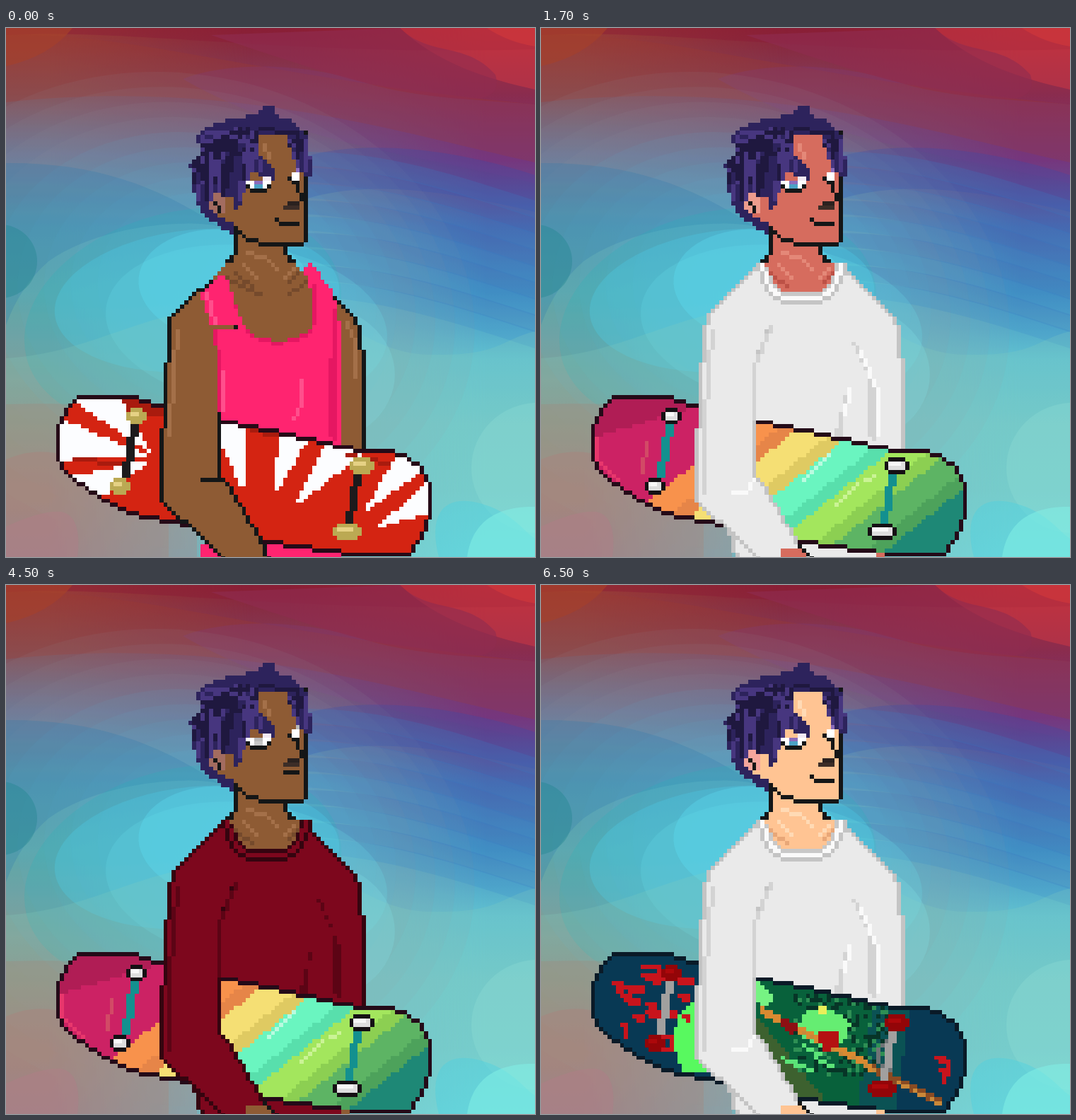
These frames come from a looping animation (748 by 748 pixels, 8000 ms). An HTML page with a canvas:

```html
<!DOCTYPE html>
<html lang="en">
<head>
<meta charset="utf-8">
<title>Skater outfits</title>
<style>
html, body { margin: 0; width: 100%; height: 100%; overflow: hidden; background: #4aa8c4; }
canvas { display: block; width: 100vw; height: 100vh; }
</style>
</head>
<body>
<canvas id="stage" width="748" height="748"></canvas>
<script>
const SIZE = 748, CELL = SIZE / 128, GRID = 129;
const INK = '#141617';

function makeContext(size, options) {
  const c = document.createElement('canvas');
  c.width = c.height = size;
  return c.getContext('2d', options);
}

function random(seed) {
  return () => (seed = seed * 16807 % 2147483647) / 2147483647;
}

// ---------- backdrop ----------
function ramp(g, colors, x = 0, width = 0) {
  const grad = g.createLinearGradient(x, 0, x + width, width ? 0 : SIZE);
  colors.split(' ').forEach((c, i, all) => grad.addColorStop(i / (all.length - 1), c));
  g.fillStyle = grad;
  g.fillRect(0, 0, SIZE, SIZE);
}

function makeBackdrop() {
  const g = makeContext(SIZE);
  const side = (colors, mask, x, width) => {
    const s = makeContext(SIZE);
    ramp(s, colors);
    s.globalCompositeOperation = 'destination-in';
    ramp(s, mask, x, width);
    g.drawImage(s.canvas, 0, 0);
  };
  const shape = (color, alpha, path) => {
    g.globalAlpha = alpha;
    g.fillStyle = color;
    g.fill(typeof path === 'string' ? new Path2D(path) : path);
    g.globalAlpha = 1;
  };
  const oval = (color, alpha, x, y, rx, ry, turn = 0) => {
    const p = new Path2D();
    p.ellipse(x, y, rx, ry, turn, 0, 7);
    shape(color, alpha, p);
  };

  // evenly spaced tones, top to bottom
  ramp(g, '#8a2236 #823f5c #62648f #459fc8 #50c4d8 #68cbce #74c8cc #74bfca #6cbccc');
  side('#9a3a34 #855259 #66789a #3d9db4 #44afac #70a79b #8e947f #a08078 #947a8c', '#000f #0000', 60, 290);
  side('#b42c38 #8a2c4e #73357a #4a68ae #4490c2 #60c0d0 #70c8cc #72cccf #74dcdf', '#0000 #000f', 400, 280);

  shape('#8a1c36', .45, 'M0 10C180 0 400 40 748 30V0H0Z');
  shape('#ab4428', .6, 'M0 54Q62 40 94 0H0Z');
  shape('#9b3b30', .3, 'M0 10C180 5 360 70 748 108V190C560 150 320 70 0 105Z');
  shape('#7d3c88', .22, 'M250 72C320 45 430 52 500 75S650 100 748 108V220C600 180 420 170 250 72Z');
  shape('#d23944', .5, 'M557 0C610 50 680 72 748 87V0Z');
  shape('#902c50', .6, 'M557 0C600 42 650 18 692 66C703 102 665 104 620 98C520 88 410 50 290 10Z');
  shape('#d93a3a', .5, 'M680 0Q710 20 748 26V0Z');

  for (let i = 0; i < 9; i++) {
    oval(i < 4 ? '#8f8f9a' : '#5ab4cc', .09, 245 + i * 5, 400 - i * 4, 420 - i * 33, 335 - i * 25, .18);
  }
  shape('#2d78ac', .25, 'M0 191C120 190 210 220 300 280C250 270 130 280 60 330Q20 365 0 420Z');
  shape('#314cb0', .25, 'M400 190C470 160 600 160 748 208V260C620 230 500 210 400 250Z');
  for (let i = 0; i < 9; i++) {
    const y = 176 + i * 23;
    shape(i % 2 ? '#386ab8' : '#3484c8', .2,
      `M390 ${y}C520 ${y - 8} 630 ${y + 30} 748 ${y + 68}v25C640 ${y + 58} 520 ${y + 18} 390 ${y + 17}Z`);
  }
  oval('#22b6b8', .2, 250, 410, 228, 150, -.25);
  oval('#4dcfee', .28, 270, 385, 202, 100, -.1);
  oval('#6ae0ea', .2, 340, 420, 200, 112, .12);
  oval('#5ce2f4', .3, 310, 365, 123, 80, .1);
  oval('#22858e', .4, -8, 330, 52, 52);
  shape('#84ccba', .22, 'M0 467C120 460 190 400 330 390S500 460 600 462S700 440 748 429V748H0Z');
  oval('#80e0e2', .25, 430, 490, 120, 100);
  shape('#a48372', .28, 'M0 532C90 530 160 530 230 560V748H0Z');
  shape('#b57672', .28, 'M0 610C80 575 140 630 270 700V748H0Z');
  shape('#b67a86', .35, 'M0 705Q50 682 78 684Q108 690 101 748H0Z');
  oval('#8edcd4', .32, 752, 622, 94, 92);
  shape('#4ad0e2', .4, 'M612 748C595 680 625 660 670 672S730 710 748 722V748Z');
  shape('#82f0e6', .55, 'M652 748C660 690 705 676 748 677V748Z');
  return g.canvas;
}

// ---------- pixel tools ----------
const scratch = makeContext(GRID, { willReadFrequently: true });
let px;

// the set of cells a path covers
function mask(d) {
  scratch.clearRect(0, 0, GRID, GRID);
  scratch.fill(new Path2D(d));
  const data = scratch.getImageData(0, 0, GRID, GRID).data;
  return (x, y) => x >= 0 && x < GRID && data[(Math.min(y, GRID - 1) * GRID + x) * 4 + 3] > 127;
}

function box(color, x, y, w = 1, h = 1) {
  px.fillStyle = color;
  px.fillRect(x, y, w, h);
}

function each(m, visit) {
  for (let y = 0; y < GRID; y++) for (let x = 0; x < GRID; x++) if (m(x, y)) visit(x, y);
}

function rim(color, m, top) {
  each(m, (x, y) => {
    if (!m(x - 1, y) || !m(x + 1, y) || !m(x, y + 1) || top && !m(x, y - 1)) box(color, x, y);
  });
}

function paint(color, d, clip) {
  const m = mask(d);
  each(m, (x, y) => { if (!clip || clip(x, y)) box(color, x, y); });
  return m;
}

function line(color, str, clip) {
  const p = str.split(' ').map(Number);
  for (let i = 2; i < p.length; i += 2) {
    const dx = p[i] - p[i - 2], dy = p[i + 1] - p[i - 1];
    const n = Math.max(Math.abs(dx), Math.abs(dy), 1);
    for (let k = 0; k <= n; k++) {
      const x = Math.round(p[i - 2] + dx * k / n), y = Math.round(p[i - 1] + dy * k / n);
      if (!clip || clip(x, y)) box(color, x, y);
    }
  }
}

const lines = (color, ...list) => list.forEach(s => line(color, s));

// ---------- skateboards ----------
const board = mask('M19 89H31L36 91 86 102H93Q101 104 103 111V118Q101 125 97 128H84L64 125 30 118Q17 112 13 106L12 103V98Q14 89 19 89Z');

function trucks(axle, base, light, frame) {
  for (const [top, bottom, y] of [[30, 28, 95], [84, 82, 107]]) {
    for (let k = 0; k < 14; k++) box(axle, Math.round(top + (bottom - top) * k / 13), y + k, 2);
  }
  for (const [x, y, w] of [[30, 93, 3], [26, 110, 3], [84, 105, 4], [80, 121, 5]]) {
    box(frame, x, y - 1, w, 4);
    box(frame, x - 1, y, w + 2, 2);
    box(base, x, y, w, 2);
    box(light, x, y, w - 1);
  }
}

function rainbowBoard() {
  const bands = ['#f8924c', '#f5df74', '#6af5c0', '#a3e65d', '#5db464', '#1e8876'];
  const shades = ['#e68548', '#dfca62', '#58dfac', '#8ccf52', '#4da25b', '#1e8876'];
  each(board, (x, y) => {
    const k = (x + 1.25 * y - 168) / 14.5, i = Math.floor(k);
    const red = y < 94 + (28 - x) * .3 ? '#b01d55' : '#cc2264';
    box(k < 0 ? red : (k - i > .64 ? shades : bands)[Math.min(i, 5)], x, y);
  });
  line('#b9fbe0', '63 109 69 103');
  lines('#cbf396', '71 115 76 110', '78 109 80 108');
  line('#d24a66', '25 100 24 107');
  line('#e8376c', '13 99 13 104 18 109');
  rim('#240a18', board, true);
  trucks('#13908f', '#dedede', '#f8f8f8', '#151014');
}

function fan(cx, cy, inner, outer, angles) {
  for (const deg of angles) {
    const a = deg * Math.PI / 180, c = Math.cos(a), s = Math.sin(a), w = (outer - inner) * .23;
    const ox = cx + outer * c, oy = cy + outer * s;
    paint('#fcfdff', `M${cx + inner * c} ${cy + inner * s}L${ox - s * w} ${oy + c * w} ${ox + s * w} ${oy - c * w}Z`, board);
  }
}

function sunBoard() {
  each(board, (x, y) => box(y < 91 + x * .06 && x > 26 && x < 40 ? '#a91b0e' : '#d42412', x, y));
  fan(36, 104, 1, 27, [227, 190, 155]);
  fan(60, 128, 15, 42, [-100, -72, -51]);
  fan(77, 128, 14, 42, [-48, -29]);
  lines('#a91b0e', '59 97 65 98', '82 103 92 105', '16 104 28 105');
  rim('#260a17', board, true);
  trucks('#1c1a1c', '#bba953', '#e5d184', '#bba953');
}

function swampBoard() {
  const rnd = random(71);
  const spot = (x, y, w, h) => [Math.floor(x + rnd() * w), Math.floor(y + rnd() * h)];
  each(board, (x, y) => {
    const k = x + y * .15;
    box(x < 45 ? '#083954' : k < 95 ? '#08613b' : k < 104 ? '#0b5254' : '#083954', x, y);
  });
  paint('#58f95f', 'M38 100L33 104 32 111 34 118H42V100Z', board);
  paint('#3d612f', 'M51 103L68 124V129H61L51 111Z', board);
  for (let i = 0; i < 230; i++) {
    const [x, y] = spot(61, 99, 23, 20);
    if (board(x, y)) box(i % 3 ? '#073527' : '#2e8f54', x, y);
  }
  // loose green leaf shapes
  paint('#65ed72', 'M64 103H70L75 106 73 111H65L62 107Z');
  paint('#76f383', 'M52 96L56 99 55 102 52 101Z');
  for (let i = 0; i < 7; i++) {
    const [x, y] = spot(58, 108, 12, 8);
    line('#5be477', `${x} ${y} ${x + 4} ${y + 2}`, board);
  }
  box('#e9ef59', 67, 102, 2, 2);
  for (let x = 53; x < 97; x++) {
    box(x < 80 ? '#d98a31' : '#8a4b22', x, Math.round(102 + (x - 53) * .52), 1, 2);
    if (rnd() < .4) box('#c98839', x, Math.round(103 + (x - 53) * .52));
  }
  paint('#b41112', 'M67 108H72V112L68 113Z');
  paint('#8d0f13', 'M57 105L62 106 61 109Z');
  line('#6f7476', '83 110 81 112 81 115 84 117');
  const scrawl = (count, left, top, w, h) => {
    for (let i = 0; i < count; i++) {
      const [x, y] = spot(left, top, w, h), dx = Math.round(rnd() * 4), dy = Math.round(rnd() * 3);
      line('#c8141c', `${x} ${y} ${x + dx} ${y} ${x + dx} ${y + dy} ${x + 1} ${y + dy}`, board);
    }
  };
  scrawl(19, 14, 91, 21, 19);
  scrawl(3, 92, 113, 5, 5);
  rim('#0a1a27', board, true);
  trucks('#a1a09f', '#930508', '#ad080b', '#930508');
}

// ---------- clothes ----------
const SLEEVE = 'M39 72H56L52 82V108L55 112 62 124 64 129H53L46 122.5 38 116 37 114V97H38V81H39Z';

function sleeve(color, edge) {
  rim(edge, paint(color, SLEEVE));
}

function neck(s, hem) {
  paint(s.skin, hem);
  rim(INK, paint(s.skin, 'M55 46H68V55L71 57H53L55 54Z'));
  paint(s.skin, 'M56 54H67L69 58H54Z');
  lines(s.glow, '58 54 62 55', '63 56 65 58', '57 57 60 60', '67 60 69 58');
  lines(s.shade, '55 59 59 62', '68 61 70 59');
}

function hands(s) {
  box(s.skin, 58, 126, 6, 3);
  line(INK, '62 125 65 128');
  box(s.skin, 81, 127, 2, 2);
}

const sweater = c => ({
  body(s) {
    const r = c.reach;
    rim(c.edge, paint(c.base, `M53 57H72L${85 + r} 70 ${86 + r} 73V78L${87 + r} 81V104L82 129H47L40 100V69Z`), true);
    lines(c.shade, '75 76 80 85 80 99', '76 78 79 84 79 98', '74 87 71 98', '73 89 72 98');
    lines(c.light, '77 78 81 88 81 98', '74 87 73 93');
    rim(c.edge, paint(c.light, 'M52 57Q53 67 62 67H67Q73 66 74 57Z'));
    rim(c.trim, paint(s.skin, 'M54 57Q55 65 61 65H66Q71 64 72 57Z'));
    neck(s, 'M55 57L56 61 61 64H66L70 61 71 57Z');
  },
  arm(s) {
    sleeve(c.base, c.edge);
    lines(c.shade, '55 72 51 82 51 94', '41 73 40 82 39 96 39 112');
    line(c.light, '46 112 49 112 51 109');
    hands(s);
  }
});

const paleSweater = sweater({ base: '#eaeaea', shade: '#d3d3d3', edge: '#c4c4c4', light: '#fafafa', trim: '#c8c8c8', reach: 1 });
const wineSweater = sweater({ base: '#7d071d', shade: '#5c0415', edge: '#35040f', light: '#7d071d', trim: '#350410', reach: 0 });

const tank = {
  body(s) {
    rim(INK, paint(s.skin, 'M54 57H69L84 69 86 73V78H87V104H50L39 80V70L47 63Z'), true);
    neck(s, 'M54 56H69L76 64 74 74H58L50 61Z');
    lines(s.shade, '53 60 61 64', '68 64 72 61');
    lines(s.glow, '82 71 84 76 84 84');
    const shirt = paint('#ff2470', 'M47 64L52 60 54 62Q57 75 61 75L67 76 73 74Q76 68 72 58L74 57 79 64 81 73V129H47L51 100 50 73Z');
    line('#e51762', '54 62 56 69 59 74 65 76 72 74 74 70 74 62', shirt);
    lines('#e51762', '79 68 79 99', '78 80 78 98');
    lines('#ff4f8c', '48 64 52 78 52 92', '71 85 71 91 69 94');
  },
  arm(s) {
    sleeve(s.skin, INK);
    lines(s.glow, '41 73 40 82 39 98');
    line('#e51762', '50 73 51 81 51 92');
    paint('#ff2470', 'M51 73H57L55 83H52Z');
    line(INK, '47 109 51 109');
  }
};

const DARK = '#820008';
const hoodie = {
  body(s) {
    rim(DARK, paint('#ac1119', 'M48 53H56L58 60H68L73 58 80 61 85 67 88 80V104L82 129H47L37 100V74L40 68 48 60Z'), true);
    neck(s, 'M56 54H67L72 57 71 60 67 61H61L57 58Z');
    line(DARK, '49 60 56 59');
    for (const d of ['M51 60H57V82L54 88 55 95H51V84L49 74 53 72Z',
      'M66 61L69 62 68 74 71 77 72 84 70 98H68L69 81 67 72Z',
      'M76 60L81 73 82 79 81 101H79V78L76 69Z']) paint(DARK, d);
    for (let x = 55; x < 78; x++) for (let y = 67; y < 73; y++) {
      if (x !== 67 && x !== 68) box((x + y) % 2 ? '#f6dedf' : '#290a10', x, y);
    }
  },
  arm(s) {
    sleeve('#ac1119', DARK);
    box(DARK, 37, 75, 2, 22);
    lines(DARK, '41 67 51 67', '50 74 51 78 50 85 47 88', '48 109 51 109');
    paint(DARK, 'M52 72H57V82L54 88 55 95H52L50 84Z');
    hands(s);
  }
};

// ---------- head ----------
function hair([base, dark, light]) {
  const rnd = random(29);
  const m = paint(base, 'M61 21L63 19H65V21L70 23 73 26V31L74 32V36H72L69 31 68 26H61V30L65 35V37L60 35 58 37 57 42 55 44V41L50 40 49 43 51 46 55 47V50L48 46 45 39V34L44 33 47 30 46 26 51 23Z');
  for (let i = 0; i < 46; i++) {
    const x = 57 + rnd() * 9, y = 20 + rnd() * 4, side = i % 5 ? -1 : 1;
    const ex = side < 0 ? 45 + rnd() * 18 : 67 + rnd() * 7, ey = 30 + rnd() * 12;
    line(i % 2 ? dark : light, `${(x + ex) / 2} ${y + 4} ${ex} ${(y + ey) / 2} ${ex + side} ${ey}`, m);
  }
  lines(light, '72 27 72 34', '60 29 61 34');
  line(dark, '61 24 68 25');
}

function head(s) {
  rim(INK, paint(s.skin, 'M49 38L54 25H73V52L71 53H63L59 52 55 49 49 45Z'));
  box(s.ear, 49, 40, 4, 5);
  line(INK, '50 42 51 44');
  line(s.glow, '62 28 63 31');
  hair(s.hair);

  box('#ffffff', 58, 37, 6);
  box('#ffffff', 59, 38, 4);
  box('#f2e9f2', 62, 36, 2);
  box(s.iris[0], 60, 37, 2);
  box(s.iris[1], 60, 38, 2);
  line(INK, '58 38 59 39 62 39 63 38');
  box('#ffffff', 69, 35, 2, 2);
  box(s.iris[0], 70, 34);
  line(INK, '68 36 69 37 70 37 70 39 71 40 71 41');
  box('#2a211f', 68, 42, 3);
  box('#3c2d27', 67, 43, 4);
  line(INK, s.stern ? '67 45 70 45' : '65 46 66 47 70 47');
}

// ---------- looks ----------
const violet = ['#2d235c', '#1f183f', '#47367f'];
const blond = ['#ffd011', '#ffad47', '#ffe257'];
const clear = ['#8b6cbb', '#4ba2c5'];
const brown = { skin: '#8e5b34', shade: '#754a2c', glow: '#a47049', ear: '#a36c60', hair: violet, iris: clear };
const coral = { skin: '#d66c5e', shade: '#bd5146', glow: '#e48878', ear: '#ed9c8d', hair: violet, iris: clear };
const rose = { skin: '#f4c4b4', shade: '#e8a999', glow: '#fbdacb', ear: '#e9a49b', hair: blond, iris: ['#7770aa', '#5a98af'] };
const peach = { skin: '#ffc493', shade: '#e8a778', glow: '#ffdab5', ear: '#f5a59c', hair: violet, iris: clear };
const stern = { ...brown, iris: ['#b9b9b9', '#c7c7c7'], stern: true };

const looks = [
  { until: 500, face: brown, wear: tank, deck: sunBoard },
  { until: 2500, face: coral, wear: paleSweater, deck: rainbowBoard },
  { until: 4500, face: rose, wear: hoodie, deck: rainbowBoard },
  { until: 6500, face: stern, wear: wineSweater, deck: rainbowBoard },
  { until: 8000, face: peach, wear: paleSweater, deck: swampBoard }
];

for (const look of looks) {
  px = makeContext(GRID);
  look.canvas = px.canvas;
  look.wear.body(look.face);
  look.deck();
  look.wear.arm(look.face);
  head(look.face);
}

const stage = document.getElementById('stage').getContext('2d');
const backdrop = makeBackdrop();
const start = performance.now();
let shown;

function draw(now) {
  const t = Math.max(0, now - start) % 8000;
  const look = looks.find(l => t < l.until);
  if (look !== shown) {
    shown = look;
    stage.imageSmoothingEnabled = false;
    stage.drawImage(backdrop, 0, 0);
    stage.drawImage(look.canvas, .5, -.6, GRID * CELL, GRID * CELL);
  }
  requestAnimationFrame(draw);
}
draw(start);
</script>
</body>
</html>
```
